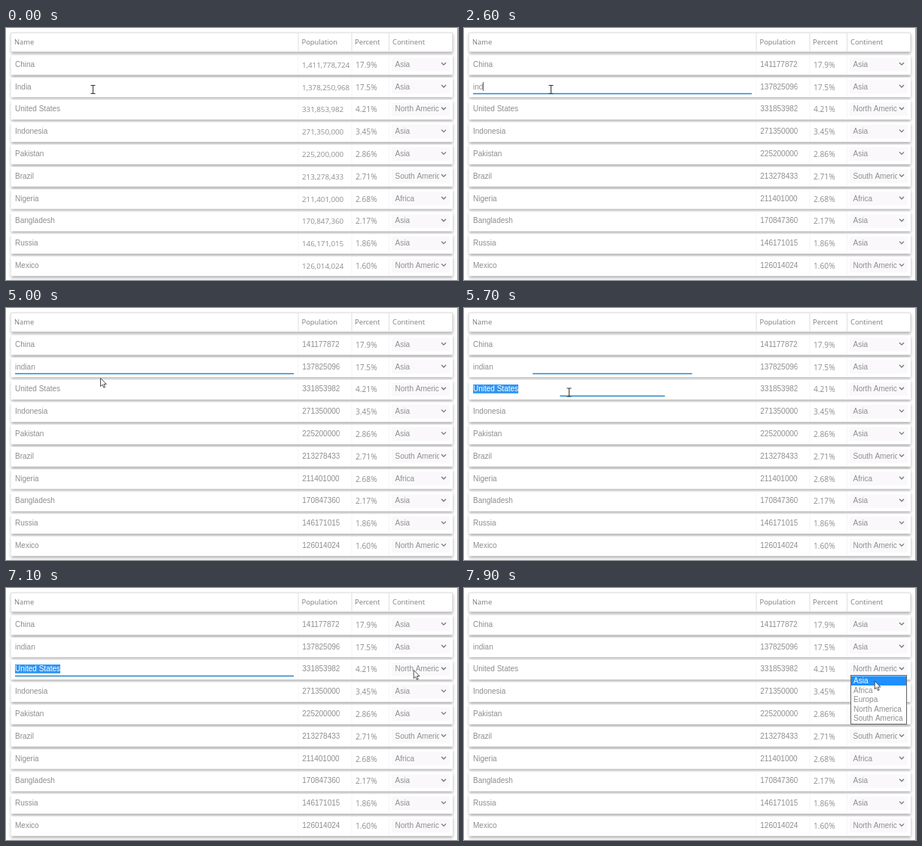
Write an HTML page with a canvas that moves like this. It is 600x336 px and loops after 8000 ms.

```html
<!DOCTYPE html>
<html lang="en">
<head>
<meta charset="utf-8">
<style>
  html, body { margin: 0; width: 100%; height: 100%; overflow: hidden; background: #fff; }
  canvas { display: block; }
</style>
</head>
<body>
<canvas id="stage" width="600" height="336"></canvas>
<script>
const ctx = document.getElementById('stage').getContext('2d');
const LOOP = 8000, FIRST = 51.7, PITCH = 29.8;
const INPUT = '10px "Liberation Sans", Arial, sans-serif';
const HEAD = '9.4px "Open Sans", sans-serif';
const NUMBER = '9.8px "Open Sans", sans-serif';
const PERCENT = '10.2px "Open Sans", sans-serif';
const GRAY = '#8e8e8e';
const SEAMS = [387.5, 458.5, 508];
const OPTIONS = ['Asia', 'Africa', 'Europa', 'North America', 'South America'];

const rows = [
  ['China', '1,411,778,724', '17.9%', 0],
  ['India', '1,378,250,968', '17.5%', 0],
  ['United States', '331,853,982', '4.21%', 3],
  ['Indonesia', '271,350,000', '3.45%', 0],
  ['Pakistan', '225,200,000', '2.86%', 0],
  ['Brazil', '213,278,433', '2.71%', 4],
  ['Nigeria', '211,401,000', '2.68%', 1],
  ['Bangladesh', '170,847,360', '2.17%', 0],
  ['Russia', '146,171,015', '1.86%', 0],
  ['Mexico', '126,014,024', '1.60%', 3]
];

// Times at which each letter of the new name is typed
const keys = [1800, 2000, 2600, 3000, 3800, 4200];
const typed = 'indian';

// Pointer path: time, x, y
const path = [
  [0, 115.5, 82], [4800, 115.5, 82], [5000, 125.5, 93.5], [5400, 139.5, 112.5],
  [6100, 139.5, 112.5], [6200, 159.2, 119.5], [6450, 270, 126], [6750, 450, 120],
  [7000, 539.5, 110], [7100, 541.2, 109.5], [7600, 541.2, 109.5], [7900, 545.2, 124]
];

const during = (t, from, to) => t >= from && t < to;
const clamp = v => Math.max(0, Math.min(1, v));
const easeOut = v => 1 - (1 - clamp(v)) ** 3;

function rect(x, y, w, h, color) {
  ctx.fillStyle = color;
  ctx.fillRect(x, y, w, h);
}

function text(str, x, y, font = INPUT, color = GRAY) {
  ctx.font = font;
  ctx.fillStyle = color;
  ctx.fillText(str, x, Math.round(y));
}

function clipped(str, x, y, right) {
  ctx.save();
  ctx.beginPath();
  ctx.rect(x - 1, y - 12, right - x + 1, 18);
  ctx.clip();
  text(str, x, y);
  ctx.restore();
}

function card(y, h) {
  ctx.save();
  ctx.shadowColor = 'rgba(0,0,0,.34)';
  ctx.shadowBlur = 4;
  ctx.shadowOffsetY = 2;
  rect(6.5, y, 586.5, h, '#fff');
  ctx.restore();
}

function underline(y, grow) {
  rect(197 - 185 * grow, y + 5.3, 370 * grow, 1.5, '#2389cf');
}

function nameCell(str, y, selected) {
  if (selected) {
    ctx.font = INPUT;
    rect(12, y - 9.3, ctx.measureText(str).width, 11.8, '#3095f3');
  }
  text(str, 12, y, INPUT, selected ? '#fff' : GRAY);
}

function chevron(x, y) {
  ctx.strokeStyle = '#777';
  ctx.lineWidth = 1.3;
  ctx.beginPath();
  ctx.moveTo(x - 3, y - 1.5);
  ctx.lineTo(x, y + 1.5);
  ctx.lineTo(x + 3, y - 1.5);
  ctx.stroke();
}

function header() {
  card(6, 26);
  ctx.strokeStyle = '#e2e2e2';
  ctx.lineWidth = 1;
  ctx.strokeRect(6.5, 6.5, 586, 25);
  for (const x of SEAMS) rect(x, 7, 1, 24, '#dfdfdf');
  ['Name', 'Population', 'Percent', 'Continent'].forEach((label, i) =>
    text(label, [11, 392.5, 463, 513][i], 22, HEAD, '#7c7c7c'));
}

function drawRow([name, population, percent, continent], i, t) {
  const y = FIRST + PITCH * i;
  card(y - 15.5, 26.3);
  for (const x of SEAMS) rect(x, y - 15, 1, 25, '#f5f5f5');

  if (i === 1) {
    const count = keys.filter(k => t >= k).length;
    if (count) name = typed.slice(0, count);
    nameCell(name, y, during(t, 300, keys[0]));
    const blinkOff = during(t, 3500, 3800) || during(t, 4700, 5200);
    if (count && t < 5700 && !blinkOff) {
      rect(Math.round(12 + ctx.measureText(name).width), y - 9.5, 1, 12, '#666');
    }
    if (t >= 300) underline(y, easeOut((t - 250) / 600) * (1 - easeOut((t - 5650) / 300)));
  } else {
    const editing = i === 2 && during(t, 5700, 7300);
    nameCell(name, y, editing);
    if (editing) underline(y, easeOut((t - 5650) / 350));
  }

  if (t < 300) text(population, 393, y + 1, NUMBER);
  else clipped(population.replaceAll(',', ''), 393.3, y, 442.8);
  text(percent, 464, y + 1, PERCENT);

  rect(512, y - 12, 77, 18, '#faf8fb');
  clipped(OPTIONS[continent], 516.5, y, 575);
  chevron(581, y - 4);
}

function dropdown(t) {
  const active = t < 7700 ? 3 : 0;
  rect(513, 116, 75, 66, '#666');
  rect(514, 117, 73, 64, '#fff');
  OPTIONS.forEach((label, i) => {
    const y = 117.5 + 12.5 * i;
    if (i === active) rect(514, y, 73, 12.5, '#1e90ff');
    text(label, 517, y + 9.5, INPUT, i === active ? '#fff' : GRAY);
  });
}

function beam(x, y) {
  ctx.strokeStyle = '#333';
  ctx.lineWidth = 1;
  ctx.beginPath();
  ctx.moveTo(x - 3, y - 5.5);
  ctx.lineTo(x + 3, y - 5.5);
  ctx.moveTo(x, y - 5.5);
  ctx.lineTo(x, y + 5.5);
  ctx.moveTo(x - 3, y + 5.5);
  ctx.lineTo(x + 3, y + 5.5);
  ctx.stroke();
}

function arrow(x, y) {
  const points = [[0, 0], [0, 11], [2.5, 8.7], [4.2, 12.7], [6, 12], [4.3, 8], [7.7, 8]];
  ctx.beginPath();
  for (const [dx, dy] of points) ctx.lineTo(x + dx, y + dy);
  ctx.closePath();
  ctx.fillStyle = '#fff';
  ctx.fill();
  ctx.strokeStyle = '#3c3c3c';
  ctx.lineWidth = 0.9;
  ctx.stroke();
}

function pointer(t) {
  let i = 0;
  while (i < path.length - 2 && t >= path[i + 1][0]) i++;
  const [t0, x0, y0] = path[i], [t1, x1, y1] = path[i + 1];
  const p = clamp((t - t0) / (t1 - t0));
  const x = x0 + (x1 - x0) * p, y = y0 + (y1 - y0) * p;
  (t < 4900 || during(t, 5200, 6150) ? beam : arrow)(x, y);
}

function draw(now) {
  const t = now % LOOP;
  rect(0, 0, 600, 336, '#fff');
  header();
  rows.forEach((row, i) => drawRow(row, i, t));
  rect(6, 334, 587, 2, '#efefef');
  rect(599, 0, 1, 336, '#999');
  if (t >= 7300) dropdown(t);
  pointer(t);
}

const start = performance.now();
function tick() {
  draw(performance.now() - start);
  requestAnimationFrame(tick);
}
tick();
</script>
</body>
</html>
```
